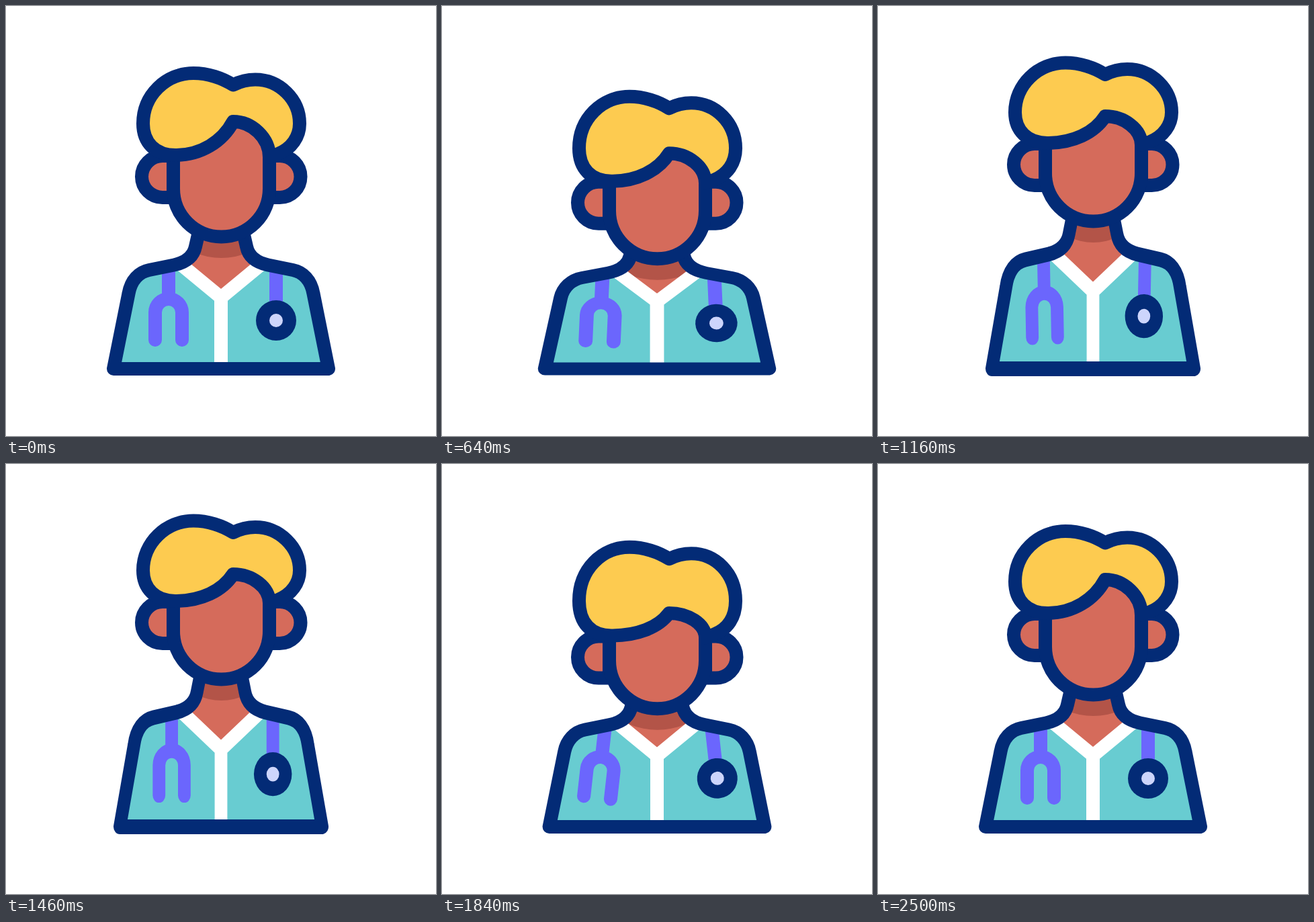
An HTML page that plays this animation: 640 by 640 pixels, repeating every 2.88 s.

```html
<!DOCTYPE html>
<html lang="en">
<head>
<meta charset="utf-8">
<title>Nurse</title>
<style>
html, body { margin: 0; width: 100%; height: 100%; overflow: hidden; background: #fff; }
svg { display: block; width: 100vw; height: 100vh; }
.line { stroke: #032b76; stroke-width: 20; stroke-linejoin: round; stroke-linecap: round; }
.skin { fill: #d56b5b; }
.strap { fill: none; stroke: #6b66fd; stroke-width: 20; stroke-linecap: round; }
</style>
</head>
<body>
<svg viewBox="0 0 640 640">
  <defs>
    <clipPath id="bodyClip"><path id="bodyShape"/></clipPath>
    <clipPath id="neckClip"><path id="neckShape"/></clipPath>
  </defs>
  <g id="body">
    <g clip-path="url(#bodyClip)">
      <path id="shirt" fill="#68ccd1"/>
      <path id="neck" class="skin"/>
      <circle id="shade" cx="320.5" r="105" fill="#b35448" clip-path="url(#neckClip)"/>
      <path fill="none" stroke="#fff" stroke-width="20" d="M254 379.500L320 434L386 379.500M320 434V540"/>
      <g id="fork">
        <path class="strap" d="M242 370V436M222 497V456A20 20 0 0 1 262 456V497"/>
      </g>
      <g id="disc">
        <path class="strap" d="M402 370V445"/>
        <circle cx="402" cy="468" r="30" fill="#032b76"/>
        <circle cx="402" cy="468" r="10" fill="#cdd5fc"/>
      </g>
    </g>
    <path id="outline" class="line" fill="none"/>
  </g>
  <g id="ears" class="line skin">
    <path d="M249 223H233A31 31 0 0 0 233 285H249Z"/>
    <path d="M392 223H407.500A31 31 0 0 1 407.500 285H392Z"/>
  </g>
  <path id="face" class="skin"/>
  <path id="jaw" class="line" fill="none"/>
  <path id="hair" class="line" fill="#fdcb50"/>
</svg>
<script>
const LOOP = 2880;
const $ = id => document.getElementById(id);
const set = (id, d) => $(id).setAttribute('d', d);
const move = (id, transform) => $(id).setAttribute('transform', transform);

// Cosine easing through [time, value] poses
function track(poses) {
  return t => {
    const i = poses.findIndex(pose => pose[0] > t);
    if (i < 1) return 0;
    const [t0, a] = poses[i - 1], [t1, b] = poses[i];
    return a + (b - a) * (1 - Math.cos(Math.PI * (t - t0) / (t1 - t0))) / 2;
  };
}

// Squash, stretch and hold, squash, stretch, rest; loose parts trail behind
const bounce = (lag, down1, up1, down2, up2) => track([
  [200, 0], [425, down1], [1050 + lag, up1], [1460, up1],
  [1680 + lag * 0.6, down2], [1980 + lag, up2], [2340 + lag * 0.3, 0]
]);

const widthAt = bounce(0, 13.5, -10, 11, -8);
const crownAt = bounce(60, 49.5, -15.5, 39, -8);
const chinAt = bounce(60, 49, -23, 40, -19);
const earAt = bounce(95, 53.5, -18, 48, -19);
const fringeAt = bounce(130, 60, -8, 60, -17);
const swingAt = track([[200, 0], [425, 7.5], [900, -4.5], [1300, 0], [1500, 0],
  [1820, 6.5], [2140, -6.5], [2500, 0]]);

function drawBody(t, chin) {
  const sx = 1 + widthAt(t) / 170, sy = sx ** -1.4;
  move('body', `translate(320 540) scale(${sx} ${sy}) translate(-320 -540)`);

  // The head presses the shoulders down; its height is mapped into body space
  const sink = chin * 0.1;
  const local = y => 540 + (y - 540) / sy;
  const top = local(310 + chin);
  const lean = Math.max(0, 358 + sink - top) * 0.23;
  const s = y => y + sink;
  const shape = `M160 540L182.5 428C186 ${s(408)} 198 ${s(396)} 213 ${s(393)}L250 ${s(385.5)}`
    + `C268 ${s(381.5)} 279 ${s(373)} 282 ${s(358)}L${282 + lean} ${top}H${358 - lean}L358 ${s(358)}`
    + `C361 ${s(373)} 372 ${s(381.5)} 390 ${s(385.5)}L427 ${s(393)}`
    + `C442 ${s(396)} 454 ${s(408)} 457.5 428L480 540Z`;
  ['bodyShape', 'shirt', 'outline'].forEach(id => set(id, shape));

  const neck = `M262 386L320 434L378 386V${top}H262Z`;
  ['neck', 'neckShape'].forEach(id => set(id, neck));
  $('shade').setAttribute('cy', local(375 + chin) - 105);

  const angle = swingAt(t);
  move('fork', `rotate(${angle} 242 400)`);
  move('disc', `rotate(${-angle} 402 400)`);
}

function drawHead(t, chin) {
  const crown = crownAt(t), ear = earAt(t), fringe = fringeAt(t);
  move('ears', `translate(0 ${ear})`);

  const jawY = 272 + chin;
  const jaw = y => `M249 ${y}V${jawY}A71.5 71.5 0 0 0 392 ${jawY}V${y}`;
  set('face', jaw(172 + fringe) + 'Z');
  set('jaw', jaw(225 + ear));

  const c = y => y + crown, e = y => y + ear, f = y => y + fringe;
  const side = 175 + (crown + ear) / 2, mid = (fringe + ear) / 2;
  set('hair', `M338 ${c(117.5)}C322 ${c(107)} 300 ${c(100)} 279 ${c(100)}`
    + `C238 ${c(100)} 204 ${c(133)} 204 ${side}C204 ${e(203)} 222 ${e(222)} 252 ${e(222)}`
    + `C290 ${e(222)} 322 ${202 + mid} 338 ${f(172)}`
    + `C366 ${f(172)} 392 ${196 + mid} 392 ${e(225)}L405 ${e(220)}`
    + `C425 ${e(212)} 437 ${e(195)} 437 ${side}`
    + `C437 ${c(139)} 407 ${c(109.5)} 371 ${c(109.5)}C360 ${c(109.5)} 349 ${c(112)} 338 ${c(117.5)}Z`);
}

function draw(t) {
  const chin = chinAt(t);
  drawBody(t, chin);
  drawHead(t, chin);
}

const start = performance.now();
function tick(now) {
  draw(Math.max(0, now - start) % LOOP);
  requestAnimationFrame(tick);
}
draw(0);
requestAnimationFrame(tick);
</script>
</body>
</html>
```
